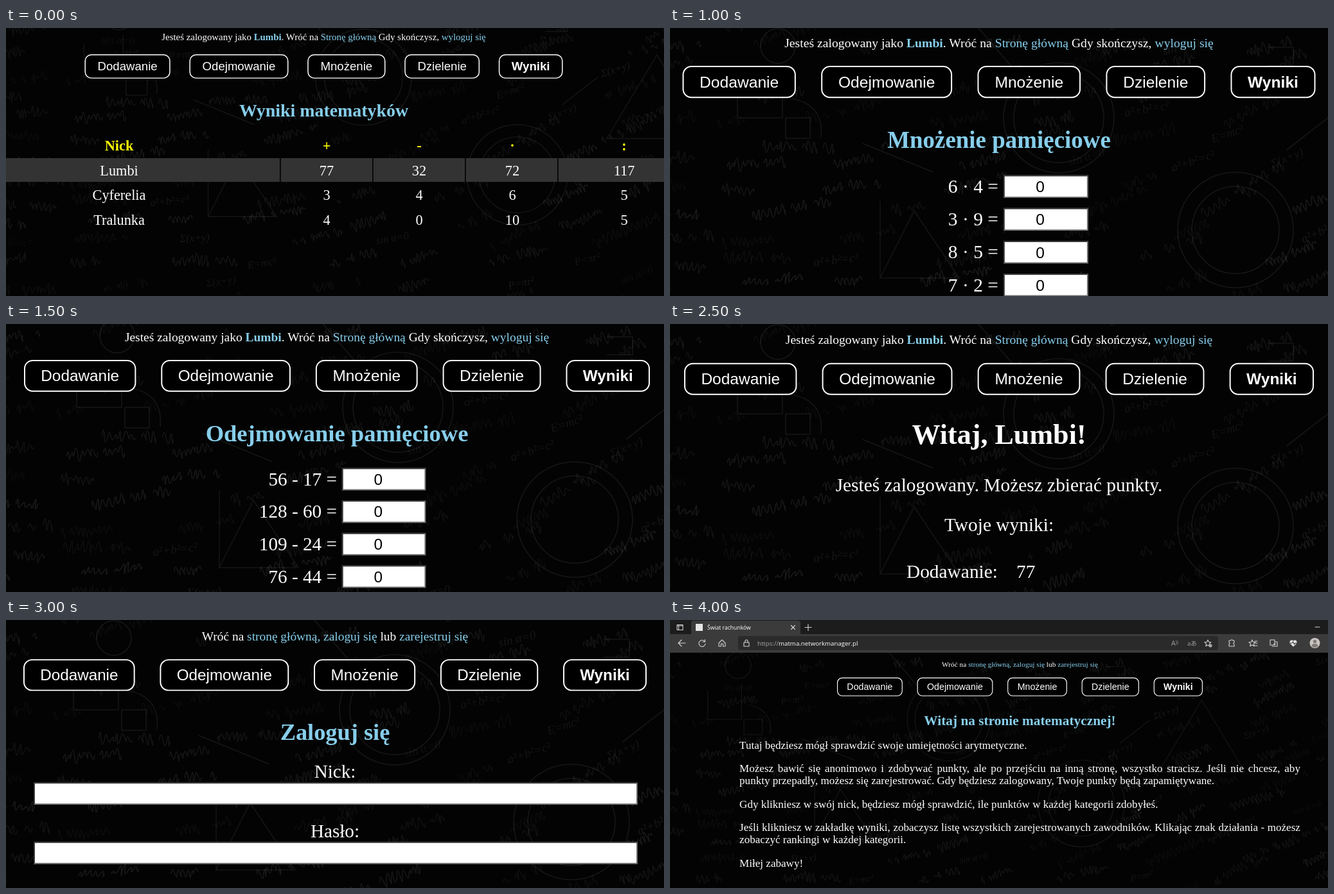
These frames come from a looping animation (1024x418 px, 4500 ms). An HTML page:

```html
<!DOCTYPE html>
<html lang="pl">
<head>
<meta charset="utf-8">
<style>
  html, body { margin: 0; width: 100%; height: 100%; overflow: hidden; background: #030303; }
  svg { display: block; }
  text, .prose { font-family: "Liberation Serif", "Times New Roman", serif; fill: #fff; color: #fff; }
  .sans { font-family: "Liberation Sans", Arial, sans-serif; }
  .ui { font-family: "Open Sans", sans-serif; }
  .mid { text-anchor: middle; }
  .end { text-anchor: end; }
  .bold { font-weight: bold; }
  .sky { fill: #87ceeb; }
  .yellow { fill: #ff0; }
  .prose { font-size: 30px; line-height: 33.7px; text-align: justify; }
  .prose p { margin: 0 0 30px; }
  .icons { fill: none; stroke: #d4d4d4; stroke-width: 1.1; stroke-linecap: round; stroke-linejoin: round; }
  .chalk { fill: none; stroke: #fff; stroke-width: 1.6; }
  .chalk text { font-style: italic; font-size: 19px; stroke: none; }
</style>
</head>
<body>
<svg id="stage" width="1024" height="418" viewBox="0 0 1024 418"></svg>
<script>
const SLIDE_MS = 500;
const NICK = 'Lumbi';

const text = (x, y, size, str, cls = '') =>
  `<text x="${x}" y="${y}" font-size="${size}" class="${cls}">${str}</text>`;
const rect = (x, y, w, h, fill, extra = '') =>
  `<rect x="${x}" y="${y}" width="${w}" height="${h}" fill="${fill}" ${extra}/>`;
const span = (str, cls = 'sky') => `<tspan class="${cls}">${str}</tspan>`;
const heading = str => text(0, 192, 37.5, str, 'mid bold sky');

// Chalkboard: seeded scribbles plus a few geometric sketches
let seed = 11;
const rnd = (a, b) => {
  seed = (seed * 16807) % 2147483647;
  return a + (b - a) * seed / 2147483647;
};

function scribble(letters) {
  let d = 'M0 0';
  for (let i = 0; i < letters; i++) {
    d += rnd(0, 1) < 0.2
      ? `m${rnd(7, 14)} 0`
      : `q${rnd(1, 6)} ${-rnd(6, 20)} ${rnd(3, 6)} ${rnd(-3, 1)}t${rnd(1, 6)} ${rnd(-2, 3)}`;
  }
  return d;
}

function chalkboard() {
  const formulas = ['E=mc²', 'sin α=0', 'P=πr²', 'Σ(x+y)', 'a²+b²=c²'];
  let out = '';
  for (let y = -40; y < 760; y += 37) {
    for (let x = -60; x < 1500; x += rnd(120, 210)) {
      const tilt = rnd(-8, 5) - Math.max(0, x) / 60;
      const mark = rnd(0, 1) < 0.16
        ? text(0, 0, 19, formulas[Math.floor(rnd(0, formulas.length))])
        : `<path d="${scribble(rnd(6, 14))}"/>`;
      out += `<g transform="translate(${x} ${y + rnd(-8, 8)}) rotate(${tilt})" opacity="${rnd(.03, .085)}">${mark}</g>`;
    }
  }
  const sketches = [[880, 315, 68], [880, 315, 90], [605, 140, 70], [605, 140, 86], [168, 28, 27]]
    .map(([x, y, r]) => `<circle cx="${x}" cy="${y}" r="${r}"/>`).join('');
  return `<g id="board" class="chalk">${out}<g opacity=".07">${sketches}
    <path d="M327 270V390H450L380 285L327 390M180 140h38v32h-38zM105 80v60h70V65M190 110q50 10 45 60
    M300 180l110 45M930 30h40v28h-40M480 0l60 70M960 190l64-50M1130 100l90 150h-180z"/></g></g>`;
}

const loggedIn = text(0, 32, 20, `Jesteś zalogowany jako ${span(NICK, 'sky bold')}. Wróć na ${span('Stronę główną')} Gdy skończysz, ${span('wyloguj się')}`, 'mid');
const loggedOut = text(0, 32, 20, `Wróć na ${span('stronę główną, zaloguj się')} lub ${span('zarejestruj się')}`, 'mid');

const nav = [['Dodawanie', -500, 179], ['Odejmowanie', -281, 207], ['Mnożenie', -34, 163],
  ['Dzielenie', 169, 157], ['Wyniki', 366, 134]].map(([label, x, w]) =>
  rect(x + 1, 63, w - 2, 49, '#000', 'rx="13" stroke="#fff" stroke-width="2"') +
  text(x + w / 2, 96, 25, label, 'sans mid' + (label === 'Wyniki' ? ' bold' : ''))).join('');

const field = (x, y, w, h) => rect(x, y, w, h, '#767676') +
  `<path d="M${x} ${y + h}V${y}h${w}l-2 2h${4 - w}v${h - 4}z" fill="#333"/>` +
  rect(x + 2, y + 2, w - 4, h - 4, '#fff');

const quiz = (title, tasks, shift = 0) => heading(title + ' pamięciowe') +
  tasks.map((task, i) => {
    const y = 235 + 52 * i;
    return text(shift - 1, y + 28, 30, task + ' =', 'end') + field(shift + 7, y, 134, 36) +
      `<text x="${shift + 65}" y="${y + 27}" font-size="25" class="sans mid" style="fill:#000">0</text>`;
  }).join('');

const form = (title, labels) => heading(title) + labels.map((label, i) =>
  text(0, 252.6 + 95.5 * i, 30, label + ':', 'mid') + field(-483.5, 260 + 95.5 * i, 969, 36)).join('');

const welcome = text(0, 191, 45, `Witaj, ${NICK}!`, 'mid bold') +
  text(0, 266, 30, 'Jesteś zalogowany. Możesz zbierać punkty.', 'mid') +
  text(0, 330, 30, 'Twoje wyniki:', 'mid') +
  text(-147, 404, 30, 'Dodawanie:') + text(27.6, 404, 30, '77');

function ranking() {
  const columns = [176, 499, 643, 788, 962];
  const rows = [['Nick', '+', '-', '·', ':'], [NICK, 77, 32, 72, 117],
    ['Cyferelia', 3, 4, 6, 5], ['Tralunka', 4, 0, 10, 5]];
  const cells = rows.map((row, i) => row.map((value, j) =>
    text(columns[j], 191 + 38.6 * i, 22.3, value, i ? 'mid' : 'mid bold yellow')).join('')).join('');
  return rect(0, 203, 1024, 37, '#333') +
    [426, 570, 714, 858].map(x => rect(x, 203, 1.7, 37, '#030303')).join('') + cells;
}

const home = heading('Witaj na stronie matematycznej!') +
  `<foreignObject x="-767" y="230.5" width="1534" height="420"><div class="prose">
  <p>Tutaj będziesz mógł sprawdzić swoje umiejętności arytmetyczne.</p>
  <p>Możesz bawić się anonimowo i zdobywać punkty, ale po przejściu na inną stronę, wszystko stracisz. Jeśli nie chcesz, aby punkty przepadły, możesz się zarejestrować. Gdy będziesz zalogowany, Twoje punkty będą zapamiętywane.</p>
  <p>Gdy klikniesz w swój nick, będziesz mógł sprawdzić, ile punktów w każdej kategorii zdobyłeś.</p>
  <p>Jeśli klikniesz w zakładkę wyniki, zobaczysz listę wszystkich zarejestrowanych zawodników. Klikając znak działania - możesz zobaczyć rankingi w każdej kategorii.</p>
  <p>Miłej zabawy!</p></div></foreignObject>`;

const star = x => `M${x} 31l1.5 3.3 3.6.4-2.7 2.4.8 3.6-3.2-1.8-3.2 1.8.8-3.6-2.7-2.4 3.6-.4z`;
const browser = rect(0, 0, 1024, 51, '#1c1c1c') + rect(0, 22, 1024, 29, '#3b3b3b') +
  rect(33, 1, 170, 24, '#3b3b3b', 'rx="4"') + rect(106, 25, 747, 22, '#2a2a2a', 'rx="4"') +
  rect(40, 6, 11, 11, '#e6e6e6') + text(58, 14.8, 8.6, 'Świat rachunków', 'ui') +
  text(136, 39.6, 9.7, '<tspan fill="#a8a8a8">https://</tspan>matma.networkmanager.pl', 'ui') +
  text(780, 40, 10.5, 'A<tspan dy="-3" font-size="7">))</tspan>', 'ui" opacity=".55') +
  text(805, 39.5, 9.5, 'aあ', 'ui" opacity=".55') +
  `<g class="icons"><path d="M11 7.500h9v8h-9zM11 9h9M13.500 9v6.500M188.500 8.500l6 6m0-6l-6 6M210 11.500h10m-5-5v10M1004 11h7
  M24 36H13m5-5l-5 5 5 5M54 33.500A5 5 0 1 0 55 37M54.500 30.500v3.500h-3.500M76 36l5-5 5 5v5h-3.500v-4h-3v4H76z
  M115 35h8v6h-8zM117 35v-2a2 2 0 0 1 4 0v2
  M870 32h2.500a1.700 1.700 0 0 1 3.300 0h2.200v3a1.700 1.700 0 0 0 0 3.200v2.800h-8v-3a1.700 1.700 0 0 0 0-3z
  ${star(837)}${star(906)}M910 33h4m-3 3h3m-4 4h4M934 31h7v8h-7zM937 41h8v-7h-4M941 36v3m-1.500-1.500h3"/>
  <circle cx="841" cy="40" r="2.600" fill="#aaa" stroke="none"/>
  <path d="M970 41l-5-5c-1-5 4-5 5-2 1-3 6-3 5 2z" fill="#f0f0f0"/><path d="M965 36h3l1.500-2 2 4 1-2h3" stroke="#333"/>
  <circle cx="1003.500" cy="36" r="8" fill="#c9c5c2" stroke="none"/><g fill="#837d79" stroke="none">
  <circle cx="1003.500" cy="33.500" r="2.700"/><path d="M998.500 41q0-4 5-4t5 4q-5 4-10 0z"/></g></g>`;

// centre x, top y, zoom, zoomed content, board transform, content in stage pixels
const near = 'translate(0 0)';
const pages = [
  [494.5, -5.2, .744, loggedIn + text(0, 192, 37.5, 'Wyniki matematyków', 'mid bold sky'), 'translate(30 -45) scale(.87)', ranking()],
  [512, 0, 1, loggedIn + quiz('Dzielenie', ['20 : 2', '25 : 5', '18 : 3', '10 : 2']), near],
  [512, -2, .985, loggedIn + quiz('Mnożenie', ['6 · 4', '3 · 9', '8 · 5', '7 · 2']), near],
  [515, -4.4, .974, loggedIn + quiz('Odejmowanie', ['56 - 17', '128 - 60', '109 - 24', '76 - 44'], 1), 'translate(5 -10)'],
  [514, -2, .976, loggedIn + quiz('Dodawanie', ['34 + 28', '61 + 45', '17 + 92', '53 + 39'], 1), 'translate(3 -5)'],
  [512, 0, .98, loggedIn + welcome, near],
  [512, 1, .97, loggedOut + form('Zaloguj się', ['Nick', 'Hasło']), near],
  [511.5, 1.2, .965, loggedOut + form('Zarejestruj się', ['Nick', 'E-mail', 'Hasło']), 'translate(0 -10)'],
  [544.5, 54.5, .569, loggedOut + home, 'translate(-20 50) scale(.75)', browser],
];

const stage = document.getElementById('stage');
stage.innerHTML = `<defs>${chalkboard()}</defs>` + rect(0, 0, 1024, 418, '#030303') +
  pages.map(([x, y, zoom, content, board, overlay = '']) => `<g class="page" display="none">
    <use href="#board" transform="${board}"/>
    <g transform="translate(${x} ${y}) scale(${zoom})">${nav}${content}</g>${overlay}</g>`).join('');

const slides = [...stage.querySelectorAll('.page')];
let shown = -1;
function tick() {
  const current = Math.floor(performance.now() / SLIDE_MS) % slides.length;
  if (current !== shown) {
    slides.forEach((slide, i) => slide.setAttribute('display', i === current ? 'inline' : 'none'));
    shown = current;
  }
  requestAnimationFrame(tick);
}
tick();
</script>
</body>
</html>
```
